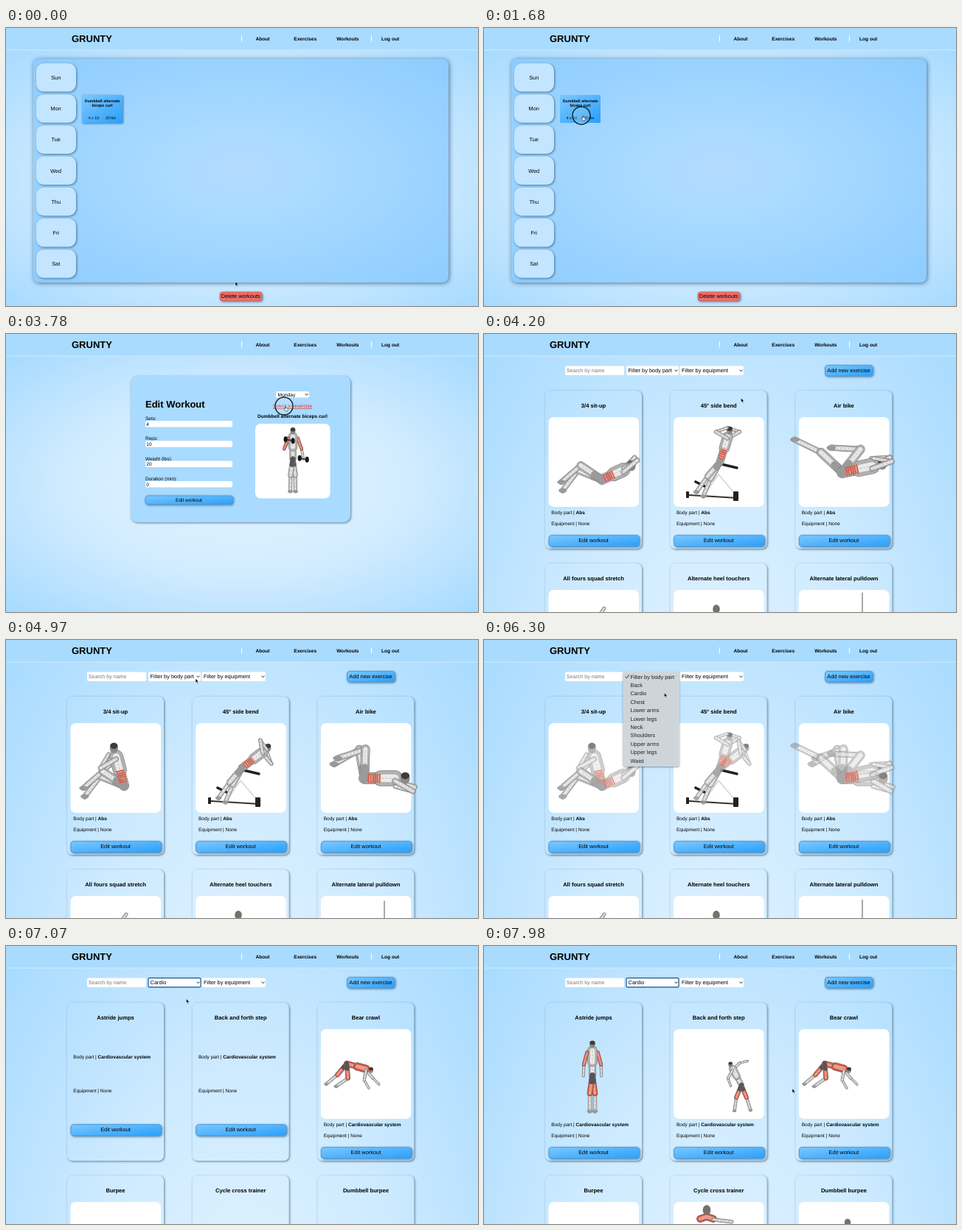
Recreate the animation shown at these times as an HTML page. Size 640x378 px, loop 8000 ms.

```html
<!DOCTYPE html>
<html lang="en">
<head>
<meta charset="utf-8">
<title>Workout planner</title>
<style>
html, body { margin: 0; width: 100%; height: 100%; overflow: hidden; }
svg { display: block; width: 640px; height: 378px; font-family: "Liberation Sans", Arial, sans-serif; text-rendering: geometricPrecision; }
.panel { filter: drop-shadow(1px 1.5px 1.6px #1a3c5aa0); }
.soft { filter: drop-shadow(.7px 1px .8px #1a3c5a90); }
polyline { fill: none; stroke-linecap: round; stroke-linejoin: round; }
.stripes { stroke-linecap: butt; stroke-dasharray: 2.2 .8; }
</style>
</head>
<body>
<svg viewBox="0 0 640 378">
  <defs>
    <radialGradient id="bg" gradientUnits="userSpaceOnUse" cx="0" cy="0" r="1" gradientTransform="translate(320 204) scale(452 246)">
      <stop stop-color="#e3f4ff"/><stop offset=".5" stop-color="#d2ecff"/><stop offset="1" stop-color="#a6daff"/>
    </radialGradient>
    <radialGradient id="tall" gradientUnits="userSpaceOnUse" cx="0" cy="0" r="1" gradientTransform="translate(320 550) scale(452 778)">
      <stop stop-color="#e3f4ff"/><stop offset=".5" stop-color="#cdeaff"/><stop offset="1" stop-color="#a6daff"/>
    </radialGradient>
    <radialGradient id="board" gradientUnits="userSpaceOnUse" cx="0" cy="0" r="1" gradientTransform="translate(319 196) scale(398 215)">
      <stop stop-color="#b4daff"/><stop offset=".25" stop-color="#abdbff"/><stop offset="1" stop-color="#8dccff"/>
    </radialGradient>
    <linearGradient id="blue" x2="1" y2="1"><stop stop-color="#7cc8ff"/><stop offset="1" stop-color="#2a9ffb"/></linearGradient>
  </defs>
  <g id="page"></g>
  <g id="live"></g>
</svg>
<script>
const LOOP = 8000;
const [page, live] = ['page', 'live'].map(id => document.getElementById(id));
const clamp = v => Math.max(0, Math.min(1, v));
const mix = (a, b, k) => a.map((v, i) => v + (b[i] - v) * k);
const within = (t, a, b) => t >= a && t < b;
const wave = (t, start, period) => Math.cos((t - start) / period * 2 * Math.PI);

const text = (x, y, s, size, o = '') => `<text x="${x}" y="${y}" font-size="${size}" ${o}>${s}</text>`;
const MID = 'text-anchor="middle" ', BOLD = 'font-weight="700" ';
const box = (x, y, w, h, r, fill, o = '') =>
  `<rect x="${x}" y="${y}" width="${w}" height="${h}" rx="${r}" fill="${fill}" ${o}/>`;
const line = (pts, w, c, o = '') => `<polyline points="${pts}" stroke="${c}" stroke-width="${w}" ${o}/>`;
const oval = (x, y, rx, ry, fill) => `<ellipse cx="${x}" cy="${y}" rx="${rx}" ry="${ry}" fill="${fill}"/>`;
const button = (x, y, w, h, label, size, cx) =>
  box(x, y, w, h, 4, 'url(#blue)', 'class="panel" stroke="#4a9fe0" stroke-width="1.1"') +
  text(cx, y + h / 2 + size * .28, label, size, MID);
const select = (x, y, w, h, label, size, o = '') =>
  box(x, y, w, h, 2, '#fff', o) + text(x + 2.6, y + h / 2 + size * .34, label, size) +
  line([x + w - 5, y + h / 2 - .8, x + w - 3.4, y + h / 2 + 1, x + w - 1.8, y + h / 2 - .8], 1, '#222');

// ---------- figures: jointed bodies, angles in degrees clockwise from right ----------
const RED = ['#cf5543', '#eba294'];
const go = ([x, y], deg, len) => [x + len * Math.cos(deg * Math.PI / 180), y + len * Math.sin(deg * Math.PI / 180)];
const limb = (pts, w, c = '#b0b0b0', hi = '#eaeaea') =>
  line(pts, w + .8, '#666') + line(pts, w, c) + line(pts, w * .5, hi) + line(pts, .4, '#777', 'stroke-dasharray="2 3"');
const dumbbell = ([x, y]) => line([x - 5, y - 1, x + 5, y + 1], 2, '#444') +
  [-5, 5].map(d => oval(x + d, y + d / 5, 2.6, 4, '#171717')).join('');

// red: t torso, l thighs, a abdomen, u upper arms; the second limb mirrors or trails the first
function man({ x, y, h, back, leg, arm, trunk = .33, front = false, red = '', shorts = '#555', bells = false,
  leg2 = pair(leg, front), arm2 = pair(arm, front) }) {
  const w = h * .07, hip = [x, y], neck = go(hip, back, h * trunk), [hx, hy] = go(neck, back, h * .085);
  const chest = mix(hip, neck, .55), tint = key => red.includes(key) ? RED : [];
  const drawLeg = ([a, b]) => {
    const knee = go(hip, a, h * .24), foot = go(knee, b, h * .24);
    return limb([knee, foot], w * .65) + limb([hip, knee], w, ...tint('l')) +
      line([hip, mix(hip, knee, .35)], w, shorts) + oval(foot[0], foot[1], w * .55, w * .3, '#999');
  };
  const drawArm = ([a, b], side) => {
    const top = [neck[0] + (front ? side * w : 0), neck[1] + w * .3];
    const elbow = go(top, a, h * .17), hand = go(elbow, b, h * .15);
    return limb([elbow, hand], w * .45) + limb([top, elbow], w * .6, ...tint('u')) + (bells ? dumbbell(hand) : '');
  };
  return drawLeg(leg2) + drawArm(arm2, 1) + limb([neck, hip], w * 1.3, ...tint('t')) +
    limb([neck, chest], w * 1.8, ...tint('t')) + drawLeg(leg) +
    (red.includes('a') ? line([mix(hip, chest, .2), chest], w * 1.1, '#d8604c', 'class="stripes"') : '') +
    oval(hx, hy, w * .55, w * .7, '#8d8885') + oval(hx, hy - w * .3, w * .5, w * .4, '#3b3b3b') + drawArm(arm, -1);
}
const pair = (angles, front) => angles.map(a => front ? 180 - a : a - 12);
const fade = (a, change, k) => [[a, 1 - k], [{ ...a, ...change }, k]].map(([p, o]) =>
  o > .01 ? `<g opacity="${Math.min(1, o * 1.25)}">${man(p)}</g>` : '').join('');
const bust = (x, y, s, c = []) => limb([[x - 9, y + 12], [x, y + 9], [x + 9, y + 12]], s, ...c) +
  oval(x, y, s * .6, s * .75, '#77716e');

const ABS = { red: 'a', shorts: '#9a9a9a' };
const SIT = { ...ABS, x: 160, y: 198, h: 145, trunk: .28, back: -105, leg: [214, 139], arm: [150, -60] };
const BEND = { ...ABS, x: 320, y: 174, h: 108, back: -38, leg: [131, 125], arm: [-100, 55], arm2: [50, -110] };
const BIKE = { ...ABS, x: 486, y: 188, h: 165, trunk: .25, back: 0, leg: [-88, 162], arm: [30, 195] };

const bench = line([278, 219, 344, 223], 2, '#333') + line([300, 217, 318, 191, 340, 217], 1.6, '#d5d5d5') +
  line([322, 177, 343, 182], 3.4, '#222') + line([287, 201, 299, 207], 3.6, '#222') +
  box(274, 214, 4, 9, 1, '#222') + box(338, 214, 7, 13, 1, '#222');

function absFigures(t) {
  const k = clamp(.5 - .9 * wave(t, 4970, 1773));
  return fade(SIT, { back: -25, trunk: .22, arm: [-40, 150] }, k) + bench +
    fade(BEND, { back: -73, arm: [210, -20], arm2: [-30, 200] }, k) +
    fade(BIKE, { back: -12, leg: [-52, 183], leg2: [223, 206], arm: [-20, 190] }, k) +
    limb([[158, 380], [163, 373]], 4) + bust(315, 374, 8) + line([513, 355 - k * 3, 513, 378], 1, '#555');
}
function cardioFigures(t, images) {
  const d = 4 * (1 - wave(t, 7070, 910));
  const crawl = { x: 462, y: 160, h: 82, back: 15, leg: [85 - d, 145], leg2: [130 + d, 140], arm: [100 - d, 60], arm2: [50 + d, 45], red: 'tl' };
  const jump = { x: 147, y: 176 - d / 4, h: 102, back: -90, front: true, leg: [98 + d, 90], arm: [105 + d, 92], red: 'lu' };
  const step = { x: 349, y: 189, h: 76, back: -118 + d / 2, leg: [112, 98], leg2: [68, 72], arm: [120 - d, 70], arm2: [-45 + d, -15], red: 'l' };
  return man(crawl) + (images[0] ? man(jump) : '') + (images[1] ? man(step) : '') +
    (images[4] ? bust(302, 359, 9, RED) + limb([[311, 372], [336, 375]], 4) : '') + (images[5] ? bust(493, 376, 7) : '');
}
function curlFigure(t) {
  const lift = .5 + .5 * wave(t, 3780, 1773), fore = k => 100 - 160 * k;
  return man({ x: 389, y: 170, h: 92, back: -90, front: true, leg: [98, 91], red: 'u', bells: true,
    arm: [110, fore(lift)], arm2: [70, 180 - fore(1 - lift)] });
}

// ---------- pages ----------
const nav = box(0, 0, 640, 30, 0, '#a9dbff') + box(0, 29.5, 640, 1, 0, '#d3ebfb') +
  text(89, 19, 'GRUNTY', 13, BOLD) +
  ['About', 'Exercises', 'Workouts', 'Log out'].map((s, i) => text(348 + i * 57.7, 17, s, 6.6, MID + BOLD)).join('') +
  [319, 495].map(x => box(x, 10, 1, 8.5, 0, '#fff')).join('');
const shell = fill => box(0, 0, 640, 378, 0, `url(#${fill})`) + nav;

function week(pressed) {
  const days = ['Sun', 'Mon', 'Tue', 'Wed', 'Thu', 'Fri', 'Sat'].map((d, i) =>
    box(41, 48 + i * 42.2, 54, 38.5, 10, '#c3e5ff', 'class="panel"') + text(67.7, 70 + i * 42.2, d, 7.3, MID));
  return shell('bg') +
    box(37, 42, 563, 304, 8, 'url(#board)', 'style="filter:drop-shadow(1px 1px 3px #2a4a66c0)"') + days.join('') +
    box(103, 91, 55, 38, 1, 'url(#blue)', pressed ? '' : 'class="panel"') +
    text(130.5, 101, 'Dumbbell alternate', 5.3, MID + BOLD) + text(130.5, 107, 'biceps curl', 5.3, MID + BOLD) +
    text(111.7, 124, '4 x 10', 5.3) + text(135, 124, '20 lbs', 5.3) +
    box(290, 359, 57, 12, 3.5, '#ee6c68', 'class="panel" stroke="#d9625f" stroke-width=".8"') +
    text(318.3, 367.2, 'Delete workouts', 7.4, MID);
}

function edit(hover) {
  const fields = [['Sets', 4], ['Reps', 10], ['Weight (lbs)', 20], ['Duration (min)', 0]].map(([s, v], i) => {
    const y = 117 + i * 27.3;
    return text(189, y, s + ':', 6.5) + box(189, y + 1, 118, 8.5, 2, '#fff') + text(190.3, y + 7.6, v, 6.5);
  });
  return shell('bg') + box(169, 57, 298, 199, 9, '#a9daff', 'class="panel"') +
    text(189, 100, 'Edit Workout', 13, BOLD) + fields.join('') +
    button(189, 220, 118.5, 11.5, 'Edit workout', 6.5, 248) + select(366, 78, 45, 8.5, 'Monday', 6.7) +
    text(388.5, 100, 'Select an exercise', 6.5, MID + `text-decoration="underline" fill="${hover ? '#e0301e' : '#000'}"`) +
    text(388.5, 114, 'Dumbbell alternate biceps curl', 6.53, MID + BOLD) + box(338, 122, 101.5, 101.5, 7, '#fff');
}

function card(i, title, part, image) {
  const x = 83 + i % 3 * 169.7, y = i < 3 ? 77 : 312, [a, b, c] = image ? [167.5, 183, 197] : [76, 121.5, 166];
  return box(x, y, 131, 215, 7, 'url(#tall)', 'class="panel"') + text(x + 65.5, y + 22.5, title, 7.6, MID + BOLD) +
    (image > 1 ? box(x + 4.5, y + 36, 122.5, 122, 7, '#fff') : '') +
    text(x + 8.3, y + a, `Body part | <tspan ${BOLD}>${part}</tspan>`, 6.54) +
    text(x + 8.3, y + b, 'Equipment | None', 6.54) +
    button(x + 5, y + c - .3, 122.5, 15.2, 'Edit workout', 7.4, x + 65.5);
}
// image states: 0 missing, 1 without backdrop, 2 shown
function gym(cardio, images) {
  const titles = cardio
    ? ['Astride jumps', 'Back and forth step', 'Bear crawl', 'Burpee', 'Cycle cross trainer', 'Dumbbell burpee']
    : ['3/4 sit-up', '45° side bend', 'Air bike', 'All fours squad stretch', 'Alternate heel touchers', 'Alternate lateral pulldown'];
  return shell('tall') +
    box(110, 43.5, 80, 12.5, 2, '#fff') + text(111.8, 52.3, 'Search by name', 7.1, 'fill="#777"') +
    select(193, 43.5, 71, 12.5, cardio ? 'Cardio' : 'Filter by body part', 7.4, cardio ? 'stroke="#2a69a8" stroke-width="1.3"' : '') +
    select(265.5, 43.5, 86.5, 12.5, 'Filter by equipment', 7.4) +
    button(462.5, 42.5, 64.5, 14.5, 'Add new exercise', 7.4, 494.5) +
    titles.map((s, i) => card(i, s, cardio ? 'Cardiovascular system' : 'Abs', images[i])).join('');
}

const menu = '<g class="soft">' + box(188.5, 42, 76.5, 130, 3, '#dbdfe1', 'opacity=".88"') + '</g>' +
  ['Filter by body part', 'Back', 'Cardio', 'Chest', 'Lower arms', 'Lower legs', 'Neck', 'Shoulders', 'Upper arms', 'Upper legs', 'Waist']
    .map((s, i) => text(198.5, 52.5 + i * 11.4, s, 7.45, 'fill="#222"')).join('') +
  line([192, 50, 193.5, 52, 196.3, 47.5], .9, '#222');

// ---------- pointer ----------
// each move: start, end, x, y
const MOVES = [[910, 1560, 132, 119], [1880, 2480, 203, 222], [2590, 3400, 377, 98],
  [3900, 4850, 257, 52.5], [5300, 6150, 244.5, 72], [7100, 7980, 418, 194]];
const CLICKS = [1630, 3690, 5030, 6400];
function pointer(t) {
  let at = [311, 345];
  for (const [from, to, ...goal] of MOVES) {
    const u = clamp((t - from) / (to - from));
    at = mix(at, goal, u * u * (3 - 2 * u));
  }
  const hand = within(t, 1500, 1900) || within(t, 3300, 4000);
  const ring = CLICKS.some(c => within(t, c, c + 180));
  const icon = hand
    ? '<path d="M1 5L0 3.6.9 3 1.6 3.7V.4h1v2.2l2.6.6v2L4.6 7H2.2z" fill="#fff" stroke="#223" stroke-width=".6"/>'
    : '<path d="M0 0V5.4L1.3 4.3 2.3 6.6 3.3 6.1 2.3 4 4 3.9z" fill="#000" stroke="#fff" stroke-width=".4"/>';
  return `<g transform="translate(${at})">` +
    (ring ? '<circle r="12" fill="#fff" fill-opacity=".15" stroke="#10222f" stroke-width="1.4"/>' : '') + icon + '</g>';
}

function update(el, html) {
  if (el.last !== html) el.innerHTML = el.last = html;
}
function render(t) {
  let base, top = '';
  if (t < 1900) base = week(t >= 1500);
  else if (t < 4000) {
    base = edit(t >= 3300);
    top = curlFigure(t);
  } else {
    const cardio = t >= 6650, late = !cardio || t >= 7450 ? 2 : 0, soon = !cardio || t >= 7300 ? 2 : 0;
    const images = [cardio ? late / 2 : 2, soon, 2, 2, late, late];
    base = gym(cardio, images);
    top = cardio ? cardioFigures(t, images) : absFigures(t);
    if (within(t, 5200, 6580)) top += menu;
  }
  update(page, base);
  update(live, top + pointer(t));
}
const start = performance.now();
function tick(now) {
  render(Math.max(0, now - start) % LOOP);
  requestAnimationFrame(tick);
}
tick(start);
</script>
</body>
</html>
```
